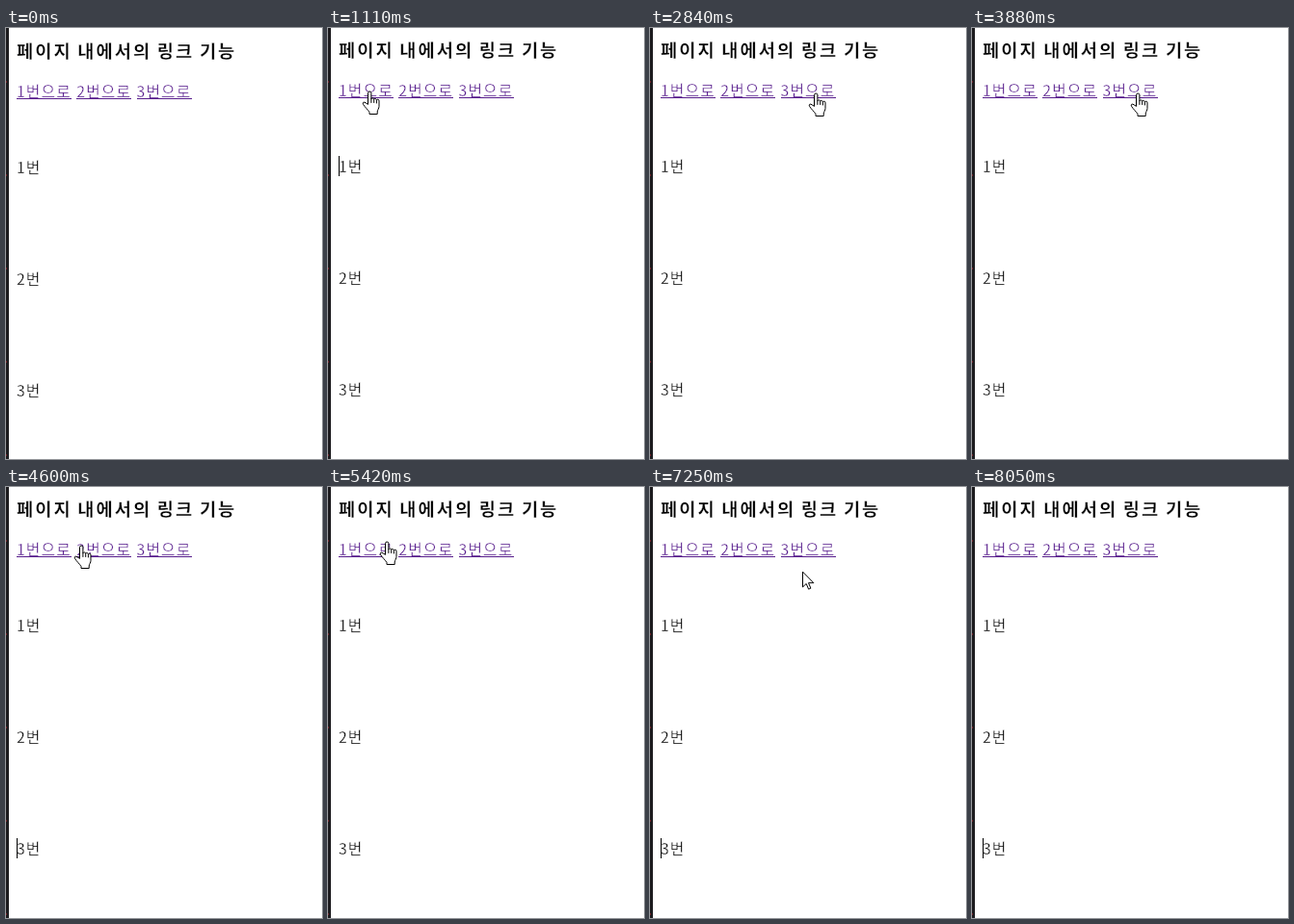
These frames come from a looping animation (328 by 448 pixels, 8.26 s). An HTML page:

```html
<!DOCTYPE html>
<html lang="ko">
<head>
<meta charset="utf-8">
<title>페이지 내에서의 링크 기능</title>
<style>
  html, body { margin: 0; width: 100%; height: 100%; overflow: hidden; background: #fff; }
  svg { display: block; width: 328px; height: 448px; }
  /* The thin white stroke slims the glyphs */
  text {
    font: 15.8px "Noto Sans CJK KR", "Noto Sans CJK", "Noto Sans CJK JP", sans-serif;
    letter-spacing: 1.1px; white-space: pre; stroke: #fff; stroke-width: .35px;
  }
  .title { font-size: 18.7px; font-weight: 700; letter-spacing: 2px; word-spacing: -1.5px; }
  .link { fill: #551a8b; }
  .link.active { fill: #f00; }
  .cursor { fill: #fff; stroke: #000; stroke-linejoin: round; stroke-linecap: round; }
</style>
</head>
<body>
<svg viewBox="0 0 328 448">
  <rect width="328" height="448" fill="#fff"/>
  <g id="page">
    <text class="title" x="11" y="30">페이지 내에서의 링크 기능</text>
  </g>
  <rect width="3" height="448" fill="#1c1b1e"/>
  <path d="M.5 55V448" stroke="#6b2028" stroke-dasharray="2 95"/>
  <rect id="caret" x="11" width="1" height="21"/>
  <g id="hand" class="cursor">
    <path d="M-1 13.5V2.2a1.7 1.7 0 0 1 3.4 0V8.2a1.5 1.5 0 0 1 2.8.4a1.5 1.5 0 0 1 2.7.8a1.4 1.4 0 0 1 2.6.9V16c0 2-1.5 3.5-1.8 5.5V24H.5V22C-1 19.5-4 17-6 13.8C-7 12-5.2 10.8-3.8 12Z"/>
    <path d="M2.4 8.2V12M5.2 9v3M7.9 10v2.5" fill="none"/>
  </g>
  <path id="arrow" class="cursor" d="M.5.5V16l3.7-3.5 2.4 5.7 2.3-1-2.4-5.5h5Z"/>
</svg>
<script>
const LOOP = 8260, STEP = 100, BLINK = 505;
const LEFT = 11, LINK_GAP = 62.3, LINK_WIDTH = 57, LINE_GAP = 116;
const get = id => document.getElementById(id);
const page = get('page'), caret = get('caret'), hand = get('hand'), arrow = get('arrow');

// Pointer path: each leg eases to a point, beginning below the stage
const entry = { x: 84, y: 448 };
const legs = [
  { from: 200, to: 700, x: 42, y: 66 },
  { from: 1530, to: 1830, x: 98, y: 67 },
  { from: 2340, to: 2740, x: 171, y: 68 },
  { from: 3990, to: 4190, x: 166, y: 83 },
  { from: 4300, to: 4700, x: 60, y: 57 },
  { from: 5420, to: 5820, x: 100, y: 63 },
  { from: 6230, to: 6630, x: 153, y: 66 },
  { from: 7150, to: 7850, x: 250, y: 460 }
];

// Clicks visit the three links in turn
const clicks = [
  { down: 1010, up: 1110 }, { down: 2240, up: 2240 }, { down: 3150, up: 3360 },
  { down: 4800, up: 4900 }, { down: 5920, up: 6020 }, { down: 6940, up: 7040 }
];

function add(parent, tag, attrs, text = '') {
  const el = document.createElementNS('http://www.w3.org/2000/svg', tag);
  for (const name in attrs) el.setAttribute(name, attrs[name]);
  el.textContent = text;
  return parent.appendChild(el);
}

const links = [0, 1, 2].map(i => {
  const x = LEFT + LINK_GAP * i;
  const link = add(page, 'g', { class: 'link' });
  add(link, 'text', { x, y: 71 }, `${i + 1}번으로`);
  add(link, 'rect', { x: Math.round(x), y: 72, width: LINK_WIDTH, height: 1 });
  add(page, 'text', { x: LEFT, y: 150 + LINE_GAP * i }, `${i + 1}번`);
  return link;
});

const smooth = p => p * p * (3 - 2 * p);
const show = (el, on) => el.setAttribute('visibility', on ? 'visible' : 'hidden');

function pointer(t) {
  let { x, y } = entry;
  for (const leg of legs) {
    if (t < leg.from) break;
    const moved = Math.floor((t - leg.from) / STEP) * STEP;
    const p = smooth(Math.min(1, moved / (leg.to - leg.from)));
    x += (leg.x - x) * p;
    y += (leg.y - y) * p;
  }
  return { x: Math.round(x), y: Math.round(y) };
}

function overLink({ x, y }) {
  const offset = x - LEFT;
  return y > 54 && y < 76 && offset >= 0 && offset < 3 * LINK_GAP && offset % LINK_GAP <= LINK_WIDTH;
}

function draw(t) {
  const pressed = clicks.findIndex(c => t >= c.down && t < c.up);
  const last = clicks.filter(c => c.up <= t).length - 1;
  links.forEach((el, i) => el.classList.toggle('active', pressed >= 0 && pressed % 3 === i));

  // The first jump scrolls the page by one pixel
  page.setAttribute('transform', `translate(0 ${last < 0 ? 1 : 0})`);

  const lit = last >= 0 && Math.floor((t - clicks[last].up) / BLINK) % 2 === 0;
  show(caret, lit && pressed < 0);
  caret.setAttribute('y', 133 + LINE_GAP * (Math.max(last, 0) % 3));

  const pos = pointer(t), over = overLink(pos);
  show(hand, over);
  show(arrow, !over);
  hand.setAttribute('transform', `translate(${pos.x + .5} ${pos.y - .5})`);
  arrow.setAttribute('transform', `translate(${pos.x} ${pos.y})`);
}

const begin = performance.now();
function tick() {
  draw((performance.now() - begin) % LOOP);
  requestAnimationFrame(tick);
}
tick();
</script>
</body>
</html>
```
